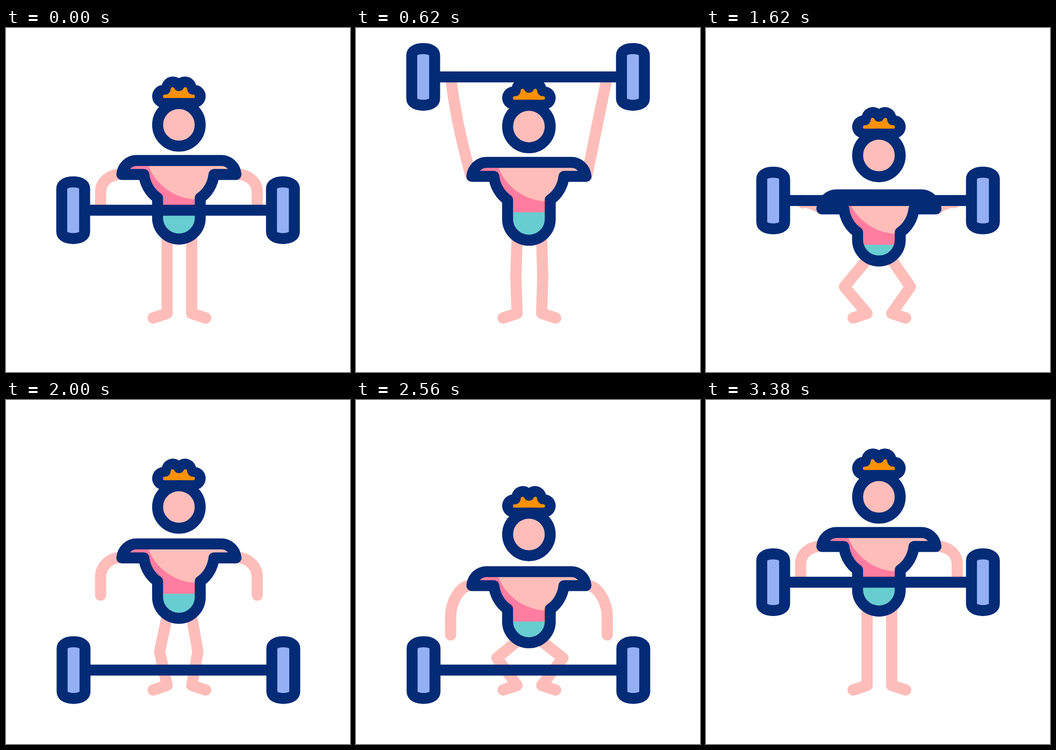
Write an HTML page with a canvas that moves like this. It is 640x640 px and loops after 3.6 s.

```html
<!DOCTYPE html>
<html lang="en">
<head>
<meta charset="utf-8">
<title>Weightlifter</title>
<style>
html, body { margin: 0; width: 100%; height: 100%; overflow: hidden; background: #fff; }
canvas { display: block; width: 100vw; height: 100vh; }
</style>
</head>
<body>
<canvas id="stage" width="640" height="640"></canvas>
<script>
const ctx = document.getElementById('stage').getContext('2d');
const LOOP = 3600, MID = 321.7, LINE = 20.4;
const NAVY = '#032b76', SKIN = '#febdb9', PINK = '#fe7da0', TEAL = '#68cdd1',
      ORANGE = '#ff9100', BLUE = '#95aff5';

const lerp = (a, b, k) => a + (b - a) * k;

// Smooth step from 0 to 1 between two times
function ease(t, from, to) {
  const s = Math.min(1, Math.max(0, (t - from) / (to - from)));
  return s * s * (3 - 2 * s);
}

const hair = new Path2D();
for (const [x, y] of [[11.2, 111.5], [28.5, 127]]) {
  for (const side of [-1, 1]) {
    const cx = MID + side * x;
    hair.moveTo(cx + 21.3, y);
    hair.arc(cx, y, 21.3, 0, Math.PI * 2);
  }
}
hair.rect(293, 111, 57.4, 37);

const crown = new Path2D(`M294.5 130.3Q292 130.3 292 127Q292 124 295 124
  C303 124 306 119 306.5 113Q307 110 310 110Q312 110 313.5 112.5
  C316 119 327.5 119 330 112.5Q331.5 110 333.5 110Q336.4 110 336.9 113
  C337.5 119 341 124 348.5 124Q351.5 124 351.5 127Q351.5 130.3 349 130.3Z`);

const plate = new Path2D(`M-21.3 -40C-21.3 -49 -11 -52.7 0 -52.7S21.3 -49 21.3 -40
  V40C21.3 49 11 52.7 0 52.7S-21.3 49 -21.3 40Z`);

function stroke(path, color, width = LINE) {
  ctx.strokeStyle = color;
  ctx.lineWidth = width;
  ctx.stroke(path);
}

function fill(path, color) {
  ctx.fillStyle = color;
  ctx.fill(path);
}

function pose(t) {
  // dip: shallow knee bend, squat: deep bend down to the floor
  const dip = t < 1000
    ? ease(t, 0, 333) - ease(t, 333, 667)
    : ease(t, 1333, 1667) - ease(t, 1667, 2200);
  const squat = ease(t, 2280, 2780) - ease(t, 2868, 3368);
  const mix = (a, b) => a * dip + b * squat;
  const shoulder = mix(67.5, 123);

  let bar;
  if (t < 345) bar = lerp(339, 406.5, ease(t, 0, 333));
  else if (t < 1333) bar = lerp(406.5, 91, ease(t, 360, 586));
  else if (t < 2800) bar = lerp(91, 502.5, ease(t, 1333, 1867));
  else bar = lerp(502.5, 339, ease(t, 2868, 3368));

  let hand = bar;
  if (t >= 1333 && t < 2280) hand = Math.min(bar, 342 + shoulder);
  else if (t >= 2280 && t < 2868) hand = lerp(342, 502.5, squat);

  return {
    bar, hand, shoulder,
    head: mix(60, 118),
    hip: mix(43, 99.5),
    kneeY: 461.5 + mix(21, 31),
    kneeL: mix(44.5, 63.5),
    kneeR: mix(36.6, 67)
  };
}

function drawLeg(side, bend, p) {
  const x = MID + side * 22.9 + 0.9;
  const leg = new Path2D();
  leg.moveTo(x, 390 + p.hip);
  leg.lineTo(x + side * bend, p.kneeY);
  leg.lineTo(x, 531);
  leg.lineTo(x + side * 26.1, 539.5);
  stroke(leg, SKIN, 20.8);
}

function drawArm(side, bow, p) {
  const top = 272 + p.shoulder;
  const reach = p.hand - top - 67;
  const up = Math.max(0, -reach) / 248;
  const ext = Math.max(0, reach);
  // Points are [offset from middle, height] resting and raised
  const at = (x0, y0, x1, y1, b) => [
    MID + side * lerp(x0, x1 + b * bow, up),
    top + lerp(y0, y1, up)
  ];
  const arm = new Path2D();
  arm.moveTo(MID + side * 107.7, top);
  arm.bezierCurveTo(
    ...at(128.7, 0, 115, -33, 0.6),
    ...at(145.7, 14 + ext * 0.7, 122, -67, 0.9),
    ...at(145.7, 33 + ext, 128.7, -100, 1));
  arm.quadraticCurveTo(
    ...at(145.7, 50 + ext, 137, -140, 0.9),
    MID + side * 145.7, p.hand);
  stroke(arm, SKIN, 20.8);
}

function drawTorso(p) {
  const y = p.shoulder, seat = 353 + p.hip;
  const body = new Path2D();
  body.moveTo(215.5, 272.5 + y);
  body.bezierCurveTo(217, 257 + y, 229, 246.5 + y, 243, 246.5 + y);
  body.lineTo(400.4, 246.5 + y);
  body.bezierCurveTo(414.4, 246.5 + y, 426.4, 257 + y, 427.9, 272.5 + y);
  body.lineTo(386.9, 272.5 + y);
  body.bezierCurveTo(385, 290 + y, 375.4, 307 + y, 361.4, 316 + y);
  body.lineTo(361.4, seat);
  body.arc(MID, seat, 39.7, 0, Math.PI);
  body.lineTo(282, 316 + y);
  body.bezierCurveTo(268, 307 + y, 258.4, 290 + y, 256.5, 272.5 + y);
  body.closePath();

  ctx.save();
  ctx.clip(body);
  ctx.fillStyle = PINK;
  ctx.fillRect(200, 230 + y, 240, 110);
  const light = new Path2D();
  light.arc(357, 220 + y, 99, 0, Math.PI * 2);
  fill(light, SKIN);
  ctx.fillStyle = TEAL;
  ctx.fillRect(270, 339.3 + y, 110, 120);
  ctx.restore();
  stroke(body, NAVY);
}

function drawHead(p) {
  ctx.save();
  ctx.translate(0, p.head);
  fill(hair, NAVY);
  fill(crown, ORANGE);
  const face = new Path2D();
  face.arc(MID, 180.2, 39.6, 0, Math.PI * 2);
  fill(face, SKIN);
  stroke(face, NAVY);
  ctx.restore();
}

function drawBarbell(p) {
  ctx.save();
  ctx.translate(Math.max(0, p.bar - 339) / 163.5 * 0.7, p.bar);
  ctx.fillStyle = NAVY;
  ctx.fillRect(146, -LINE / 2, 348, LINE);
  for (const x of [125, 515.2]) {
    ctx.save();
    ctx.translate(x, 0);
    fill(plate, BLUE);
    stroke(plate, NAVY);
    ctx.restore();
  }
  ctx.restore();
}

function draw(t) {
  const p = pose(t);
  ctx.fillStyle = '#fff';
  ctx.fillRect(0, 0, 640, 640);
  drawLeg(-1, p.kneeL, p);
  drawLeg(1, p.kneeR, p);
  drawArm(-1, 4, p);
  drawArm(1, 0, p);
  drawTorso(p);
  drawHead(p);
  drawBarbell(p);
}

ctx.lineCap = ctx.lineJoin = 'round';
const start = performance.now();
function tick() {
  draw((performance.now() - start) % LOOP);
  requestAnimationFrame(tick);
}
tick();
</script>
</body>
</html>
```
